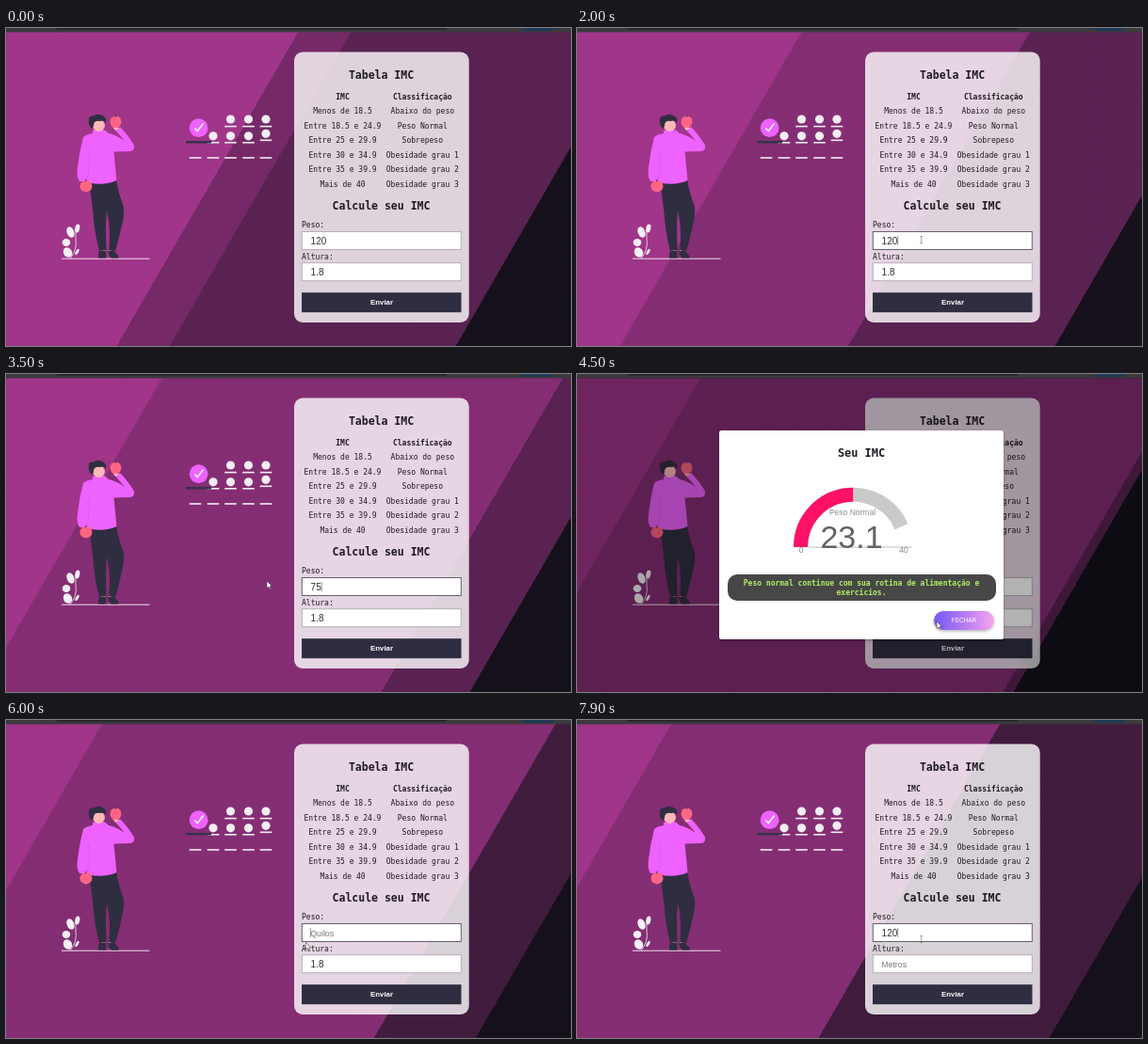
An HTML page for the animation above (8000 ms loop, 600 by 338 pixels).

```html
<!DOCTYPE html>
<html lang="pt-BR">
<head>
<meta charset="utf-8">
<title>Tabela IMC</title>
<style>
html, body { margin: 0; width: 100%; height: 100%; overflow: hidden; background: #17121c; }
#stage { position: relative; width: 600px; height: 338px; overflow: hidden; }
.band {
  position: absolute; left: -302px; top: 4px; width: 1208px; height: 334px; opacity: .37;
  background: linear-gradient(-60deg, #17121c 50%, #cf41af 50%);
}
svg { position: absolute; left: 0; top: 0; }
.mono { font: 8px "DejaVu Sans Mono", monospace; fill: #1d1a23; }
.bold { font-weight: 700; }
.mid { text-anchor: middle; }
.sans { font-family: "Liberation Sans", Arial, sans-serif; }
.title { font-size: 11.5px; font-weight: 700; }
.field { fill: #fff; stroke: #b5afb7; }
.field.on { stroke: #65606c; }
</style>
</head>
<body>
<div id="stage">
  <div class="band"></div><div class="band"></div><div class="band"></div>
  <svg width="600" height="338" viewBox="0 0 600 338">
    <defs>
      <linearGradient id="pill"><stop offset="0" stop-color="#7658f4"/><stop offset=".5" stop-color="#b67bf3"/><stop offset="1" stop-color="#f7a5ec"/></linearGradient>
      <filter id="shade" x="-20%" y="-20%" width="140%" height="150%"><feDropShadow dx="0" dy="1.5" stdDeviation="1.5" flood-opacity=".3"/></filter>
    </defs>

    <!-- window edge -->
    <path fill="#3b3a3d" d="M0 0H600V4.5H0z"/>
    <path fill="#222124" d="M53 0H469L467 1.5H55z"/>
    <path fill="#1f3a57" d="M548 0H582L580 3H550z"/>

    <!-- plant -->
    <g fill="#f4eff4">
      <path d="M68 245Q76 236 74 224Q73 217 76 211" fill="none" stroke="#f4eff4" stroke-width=".8"/>
      <ellipse cx="68.500" cy="217" rx="3.800" ry="6" transform="rotate(-22 68.500 217)"/>
      <ellipse cx="75.800" cy="213" rx="2.500" ry="4.500" transform="rotate(12 75.800 213)"/>
      <ellipse cx="64" cy="228" rx="4.300" ry="4"/>
      <ellipse cx="65.500" cy="238.500" rx="4.500" ry="5.500" transform="rotate(-25 65.500 238.500)"/>
      <ellipse cx="75.500" cy="238" rx="1.400" ry="3.500" transform="rotate(30 75.500 238)"/>
    </g>

    <!-- man -->
    <path d="M59 245.2H152.5" stroke="#eee3ec"/>
    <path fill="#ffb8b8" d="M100 234H106V239H100zM109 233H115V239H109z"/>
    <path fill="#2f2e41" d="M88 162L117 160Q119 175 125 190Q126 200 122 214Q119 228 116 237L109 236Q112 215 107 194L106 208Q106 224 106.500 236L99 237Q96 226 94 212Q92 190 88 162z"/>
    <path fill="#2f2e41" d="M99 237L106 236.500L106.500 244.500H98Q97.500 240 99 237zM108.500 237L114 236L119.500 242V244.500H112Q108 241 108.500 237z"/>
    <path fill="#ee62ff" d="M92 109Q98 107 105 108.500L109 112Q118 114 126 120Q121 114 116.500 109L121 105Q129 113 136 124.500Q137 130 132 131L114.500 131.500L117.500 162Q104 168 88.500 164.500L85 163H78Q74.500 158 76 148Q78 131 82 116Q85 113 92 112z"/>
    <path d="M88 131L88 150L86 163" fill="none" stroke="#d557e8" stroke-width=".6"/>
    <ellipse cx="98.500" cy="103.500" rx="6.500" ry="6.500" fill="#ffb8b8"/>
    <path fill="#2f2e41" d="M88 98Q87 93 93 93.500Q98 90 104 94Q108 97 105.500 101Q104 97.500 100 99Q95 98 93.500 101Q93 105 91.500 107Q87 104 88 98z"/>
    <path fill="#ffb8b8" d="M112 103L118 104L120 107L116 109z"/>
    <ellipse cx="116.500" cy="99.700" rx="6" ry="6.300" fill="#ff6584"/>
    <ellipse cx="85" cy="168.200" rx="6.500" ry="6.200" fill="#ff6584"/>
    <path d="M116 95L117 92M84.500 163.500L85 160.500" stroke="#2f2e41" stroke-width=".8"/>

    <!-- calendar -->
    <g id="marks" fill="#f2edf2"></g>
    <path fill="#35324a" d="M191 120H218V122.500H191z"/>
    <circle cx="204.600" cy="106.200" r="9.900" fill="#ee62ff"/>
    <path d="M200.300 106.500L203.300 109.500L209.500 101.500" fill="none" stroke="#fff" stroke-width="1.500"/>

    <!-- card -->
    <rect x="306" y="25.500" width="185.700" height="287.500" rx="9" fill="#fff" fill-opacity=".8"/>
    <g class="mono">
      <text class="title mid" x="398.500" y="53.500">Tabela IMC</text>
      <g id="table" class="mid"></g>
      <text class="title mid" x="398.500" y="193">Calcule seu IMC</text>
      <text x="314" y="212.400">Peso:</text>
      <text x="314" y="245.600">Altura:</text>
    </g>
    <rect class="field" x="314.300" y="216.500" width="169" height="19"/>
    <rect class="field" x="314.300" y="249.700" width="169" height="19"/>
    <text class="value sans" y="229.700"></text>
    <text class="value sans" y="262.900"></text>
    <path id="caret" stroke="#666" stroke-width=".7"/>
    <rect x="314" y="281.200" width="169.500" height="21" fill="#2f2e41"/>
    <text class="sans mid bold" x="399" y="294.300" font-size="7.800" fill="#fff">Enviar</text>

    <!-- result -->
    <g id="modal">
      <path d="M0 4H600V338H0z" opacity=".3"/>
      <rect x="151" y="60" width="302" height="222" rx="2.500" fill="#fff" filter="url(#shade)"/>
      <text class="mono title mid" x="302" y="88" style="font-size:11.900px">Seu IMC</text>
      <path id="track" fill="none" stroke="#cacaca" stroke-width="15"/>
      <path id="level" fill="none" stroke="#ff1168" stroke-width="15"/>
      <path d="M245 184H356" stroke="#aaa" stroke-width=".8"/>
      <g class="sans mid">
        <text x="292.500" y="150" font-size="8.500" fill="#8a8a8a">Peso Normal</text>
        <text x="291.500" y="184.500" font-size="34" fill="#636363">23.1</text>
        <text x="238" y="190" font-size="8.500" fill="#858585">0</text>
        <text x="347" y="190" font-size="8.500" fill="#858585">40</text>
      </g>
      <rect x="160" y="213" width="285" height="28" rx="10" fill="#474747"/>
      <g class="mono bold mid" style="fill:#aef065">
        <text x="302" y="225">Peso normal continue com sua rotina de alimentação e</text>
        <text x="302" y="235">exercicios.</text>
      </g>
      <rect x="379" y="252" width="64" height="20" rx="10" fill="url(#pill)" filter="url(#shade)"/>
      <text class="sans mid" x="411" y="264.300" font-size="6.400" fill="#fff">FECHAR</text>
    </g>

    <g id="pointer">
      <path id="arrow" d="M0 0V7.500L1.800 6L3 8.500L4.200 8L3.100 5.500H5.300z" fill="#fff" stroke="#222" stroke-width=".5"/>
      <path id="beam" d="M-1.500 -3.500H1.500M0 -3.500V3.500M-1.500 3.500H1.500" fill="none" stroke="#888" stroke-width=".7"/>
    </g>
  </svg>
</div>
<script>
const LOOP = 8000;
const $ = id => document.getElementById(id);
const all = sel => [...document.querySelectorAll(sel)];
const clamp = v => Math.max(0, Math.min(1, v));

// Sliding diagonals: start shift, duration, time already elapsed
const bands = [[302, 15000, 7960], [-302, 12000, 4965], [-302, 13000, 10960]];
const slides = all('.band').map((el, i) => {
  const [x, duration, offset] = bands[i];
  const anim = el.animate(
    [{ transform: `translateX(${x}px)` }, { transform: `translateX(${-x}px)` }],
    { duration, easing: 'ease-in-out', direction: 'alternate', iterations: Infinity });
  anim.pause();
  return { anim, offset };
});

const rows = [
  ['IMC', 'Classificação'], ['Menos de 18.5', 'Abaixo do peso'],
  ['Entre 18.5 e 24.9', 'Peso Normal'], ['Entre 25 e 29.9', 'Sobrepeso'],
  ['Entre 30 e 34.9', 'Obesidade grau 1'], ['Entre 35 e 39.9', 'Obesidade grau 2'],
  ['Mais de 40', 'Obesidade grau 3']
];
$('table').innerHTML = rows.map((row, i) => row.map((text, col) =>
  `<text class="${i ? '' : 'bold'}" x="${col ? 442.3 : 357.5}" y="${75.7 + i * 15.5}">${text}</text>`
).join('')).join('');

const dash = (x, y) => `<rect x="${x - 6.3}" y="${y}" width="12.6" height="1.6"/>`;
const dot = (x, y) => `<circle cx="${x}" cy="${y}" r="4.6"/>`;
const cols = [201, 220, 238.5, 257.5, 276];
$('marks').innerHTML = cols.map((x, i) => {
  const lift = i === 4 ? 2.5 : 0;
  return dash(x, 137.2) +
    (i > 0 ? dot(x, 114.8 - lift) + dash(x, 121 - lift) : '') +
    (i > 1 ? dot(x, 97) + dash(x, 103.8) : '');
}).join('');

function arc(deg) {
  const a = Math.PI * (1 - deg / 180), r = 55.7;
  return `M${293.2 - r} 184A${r} ${r} 0 0 1 ${293.2 + r * Math.cos(a)} ${184 - r * Math.sin(a)}`;
}
$('track').setAttribute('d', arc(157));

// time, weight, height, focused field
const states = [
  [0, '120', '1.8', -1], [1800, '120', '1.8', 0], [2900, '7', '1.8', 0],
  [3100, '75', '1.8', 0], [3600, '75', '1.8', -1], [5300, '75', '1.8', 1],
  [5550, '75', '1.8', 0], [5900, '', '1.8', 0], [6200, '', '1.8', 1],
  [6500, '', '', 1], [7050, '', '', 0], [7300, '1', '', 0],
  [7500, '12', '', 0], [7700, '120', '', 0]
];
// time, x, y
const path = [
  [1000, 330, 338], [1700, 365.5, 225], [2200, 365.5, 225], [2700, 277, 220],
  [3600, 277, 220], [4400, 381, 264], [4500, 382, 263], [4700, 410, 262],
  [5000, 415, 261], [5300, 415, 261], [5550, 372, 228], [5900, 300, 228],
  [6200, 370, 260], [6500, 312, 260], [6800, 363, 230], [7000, 365.5, 233],
  [8000, 365.5, 233]
];
const hints = ['Quilos', 'Metros'];
const fields = all('.field'), values = all('.value');

function drawForm(t) {
  const [, weight, height, focus] = states.filter(s => s[0] <= t).pop();
  [weight, height].forEach((text, i) => {
    const el = values[i];
    el.textContent = text || hints[i];
    el.setAttribute('x', text ? 323.6 : 323.2);
    el.setAttribute('font-size', text ? 10 : 8.8);
    el.setAttribute('fill', text ? '#333' : '#777');
    fields[i].classList.toggle('on', focus === i);
  });
  $('caret').style.display = focus < 0 ? 'none' : '';
  if (focus >= 0) {
    const typed = focus ? height : weight;
    const x = typed ? 324 + values[focus].getComputedTextLength() : 323.3;
    $('caret').setAttribute('d', `M${x} ${focus ? 254 : 221}v10`);
  }
}

function drawPointer(t, open) {
  $('pointer').style.display = t < path[0][0] ? 'none' : '';
  const i = Math.max(1, path.findIndex(p => p[0] > t));
  const [t0, x0, y0] = path[i - 1], [t1, x1, y1] = path[i];
  const u = clamp((t - t0) / (t1 - t0)), k = u * u * (3 - 2 * u);
  const x = x0 + (x1 - x0) * k, y = y0 + (y1 - y0) * k;
  const typing = !open && x > 314 && x < 484 && ((y > 216 && y < 236) || (y > 249 && y < 269));
  $('pointer').setAttribute('transform', `translate(${x} ${y})`);
  $('arrow').style.display = typing ? 'none' : '';
  $('beam').style.display = typing ? '' : 'none';
}

function draw(t) {
  slides.forEach(s => { s.anim.currentTime = t + s.offset; });
  const shown = clamp((t - 3550) / 250) * clamp((5000 - t) / 250);
  $('modal').style.opacity = shown;
  $('modal').style.display = shown ? '' : 'none';
  const fill = 1 - (1 - clamp((t - 3700) / 700)) ** 3;
  $('level').setAttribute('d', arc(90 * fill));
  drawForm(t);
  drawPointer(t, shown > 0);
}

const start = performance.now();
function tick() {
  draw((performance.now() - start) % LOOP);
  requestAnimationFrame(tick);
}
tick();
</script>
</body>
</html>
```
